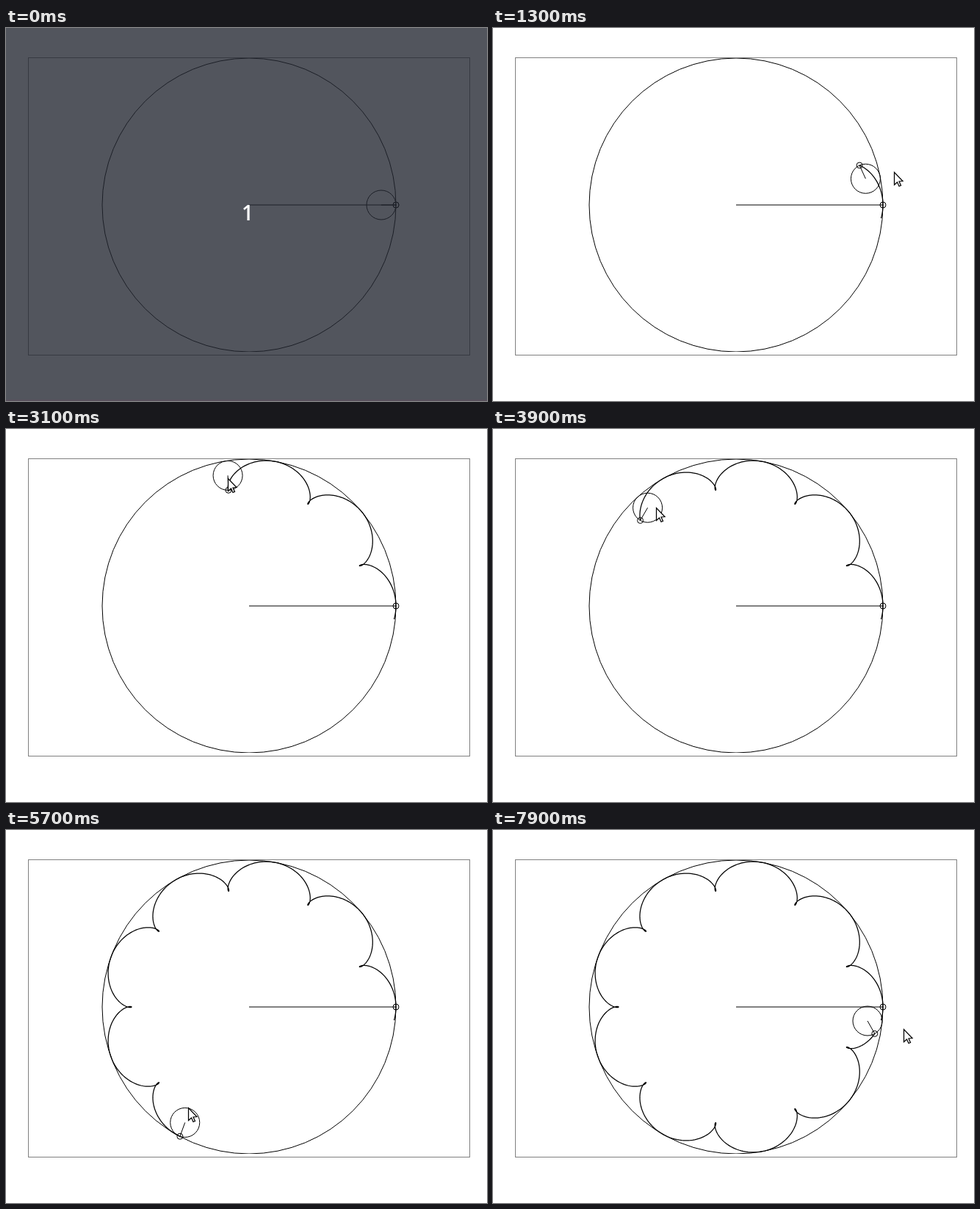
Recreate the animation shown at these times as an HTML page with a canvas. Size 655x508 px, loop 8 s.

```html
<!DOCTYPE html>
<html lang="en">
<head>
<meta charset="utf-8">
<title>Rolling circle</title>
<style>
  html, body { margin: 0; width: 100%; height: 100%; overflow: hidden; background: #fff; }
  canvas { display: block; }
</style>
</head>
<body>
<canvas id="stage" width="655" height="508"></canvas>
<script>
const ctx = document.getElementById('stage').getContext('2d');
const LOOP = 8000, STEP = 100, INTRO_END = 400, DRAG_START = 700, DRAG_END = 7900;
const CX = 331, CY = 241, BIG = 200, SMALL = 20, ARM = BIG - SMALL;
const FIRST_ANGLE = -2.8, RAD = Math.PI / 180;

// Uneven hand speed: [time, wheel angle]
const DRAG = [
  [DRAG_START, FIRST_ANGLE], [1500, 18.3], [2000, 45.45], [3100, 99.25], [3300, 104],
  [4600, 170.4], [5100, 197.8], [5700, 241], [6900, 311.1], [DRAG_END, 353.94]
];

const ramp = (t, from, to) => Math.min(1, Math.max(0, (t - from) / (to - from)));

function slope(i) {
  const k = Math.min(Math.max(i, 0), DRAG.length - 2);
  return (DRAG[k + 1][1] - DRAG[k][1]) / (DRAG[k + 1][0] - DRAG[k][0]);
}

const tangent = i => (slope(i - 1) + slope(i)) / 2;

// Cubic Hermite through the drag points
function wheelAngle(t) {
  const i = Math.max(0, DRAG.findIndex(k => k[0] >= t) - 1);
  const [t0, a0] = DRAG[i], [t1, a1] = DRAG[i + 1];
  const span = t1 - t0, u = ramp(t, t0, t1), v = 1 - u;
  return (1 + 2 * u) * v * v * a0 + u * v * v * span * tangent(i)
    + (3 - 2 * u) * u * u * a1 - u * u * v * span * tangent(i + 1);
}

function polar(deg, r, x = CX, y = CY) {
  return [x + r * Math.cos(deg * RAD), y - r * Math.sin(deg * RAD)];
}

const hubAt = deg => polar(deg, ARM);
const penAt = deg => polar(deg * BIG / SMALL, SMALL, ...hubAt(deg));

// The hand swings in, drifts inwards, lags a little, then moves out again
function pointerAt(t) {
  const lag = 3 * ramp(t, 3100, 3300) - 1.4 * ramp(t, 4600, 5700);
  const r = 190 - 43 * ramp(t, DRAG_START, DRAG_END)
    + 116 * (1 - ramp(t, DRAG_START, 2000)) ** 2
    + 84 * ramp(t, 5700, DRAG_END);
  return polar(wheelAngle(t) - lag, r);
}

function circle([x, y], r) {
  ctx.beginPath();
  ctx.arc(x, y, r, 0, 2 * Math.PI);
  ctx.stroke();
}

function path(points) {
  ctx.beginPath();
  points.forEach(p => ctx.lineTo(...p));
}

function drawTrace(end) {
  const points = [];
  for (let a = FIRST_ANGLE; a < end; a += 0.5) points.push(penAt(a));
  points.push(penAt(end));
  path(points);
  ctx.lineWidth = 1.25;
  ctx.stroke();
  ctx.lineWidth = 1;
}

function drawWheel(deg) {
  const hub = hubAt(deg), pen = penAt(deg);
  circle(hub, SMALL);
  path([hub, pen]);
  ctx.stroke();
  circle(pen, 4);
}

function drawPointer([x, y]) {
  const arrow = [[0, 0], [0, 17], [4, 13.5], [6.5, 19], [9, 18], [6.5, 12.5], [11.5, 12]];
  path(arrow.map(([dx, dy]) => [Math.round(x) + dx - 0.5, Math.round(y) + dy - 0.5]));
  ctx.closePath();
  ctx.fillStyle = '#fff';
  ctx.fill();
  ctx.lineWidth = 1.25;
  ctx.stroke();
}

function drawIntro() {
  ctx.fillStyle = 'rgba(36, 40, 50, 0.79)';
  ctx.fillRect(0, 0, 655, 508);
  ctx.fillStyle = '#58515d';
  ctx.fillRect(0, 506, 655, 2);
  ctx.fillStyle = '#fff';
  ctx.font = '600 28px "Open Sans", "Noto Sans", sans-serif';
  ctx.fillText('1', 321, 262);
}

function draw(t) {
  const dragging = t >= DRAG_START;
  const deg = dragging ? wheelAngle(t) : 0;

  ctx.fillStyle = '#fff';
  ctx.fillRect(0, 0, 655, 508);
  ctx.lineWidth = 1;
  ctx.strokeStyle = '#808080';
  ctx.strokeRect(30.5, 40.5, 601, 405);

  ctx.strokeStyle = '#000';
  ctx.save();
  ctx.beginPath();
  ctx.rect(31, 41, 600, 400);
  ctx.clip();
  circle([CX, CY], BIG);
  path([[CX, CY], [CX + BIG, CY]]);
  ctx.stroke();
  circle([CX + BIG, CY], 4);
  if (dragging) drawTrace(deg);
  drawWheel(deg);
  ctx.restore();

  if (dragging) drawPointer(pointerAt(t));
  if (t < INTRO_END) drawIntro();
}

const start = performance.now();
function tick() {
  const t = (performance.now() - start) % LOOP;
  draw(Math.floor(t / STEP) * STEP);
  requestAnimationFrame(tick);
}
tick();
</script>
</body>
</html>
```
